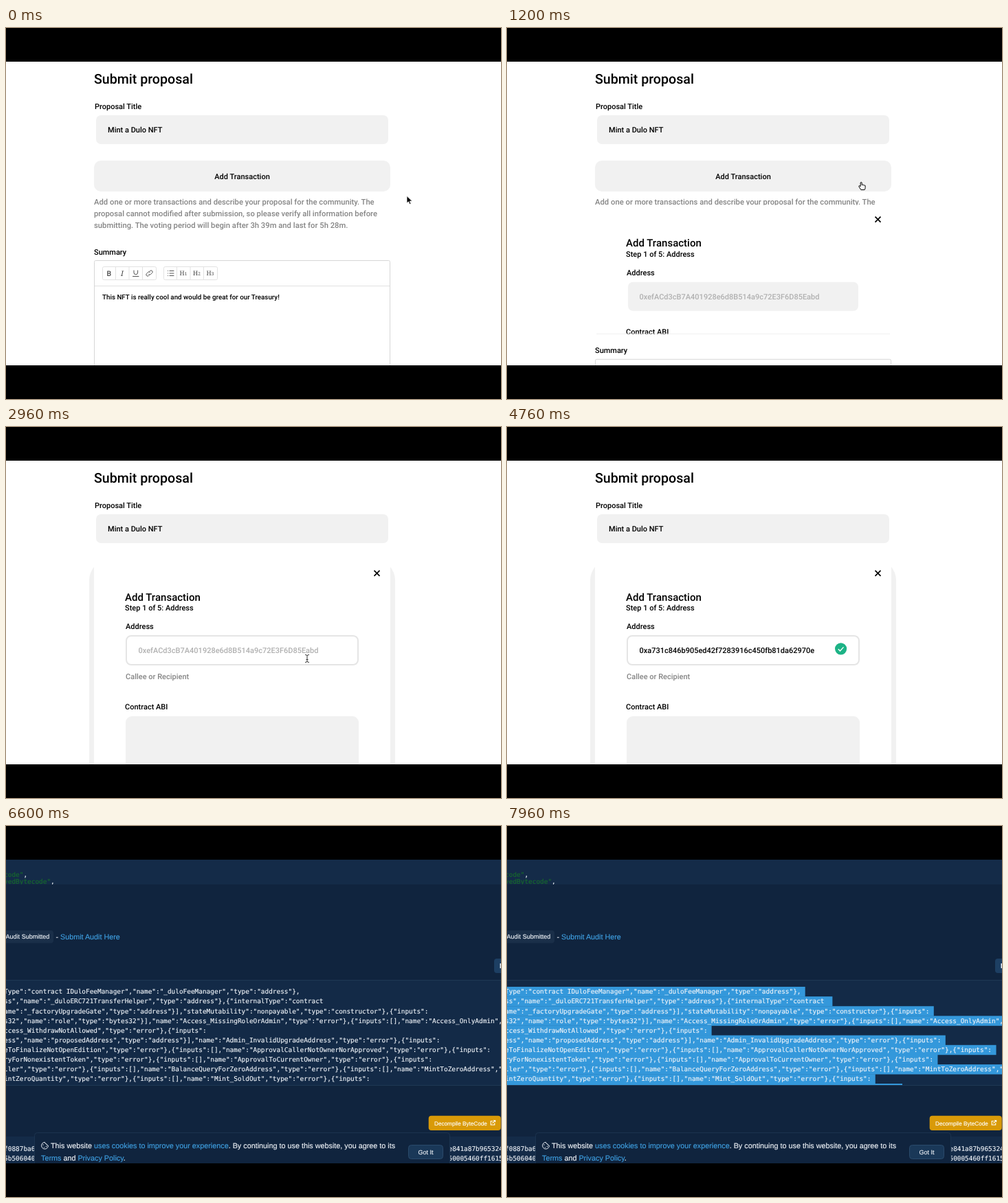
Write an HTML page that moves like this. It is 720 px wide and 540 px high and loops after 8 s.

```html
<!DOCTYPE html>
<html lang="en">
<head>
<meta charset="utf-8">
<title>Proposal form</title>
<style>
  html, body { margin: 0; width: 100%; height: 100%; overflow: hidden; background: #000; }
  svg { display: block; width: 100vw; height: 100vh; }
  text { white-space: pre; text-rendering: geometricPrecision; }
  .ui { font-family: Roboto, sans-serif; font-weight: 500; }
  .site { font-family: "Liberation Sans", Arial, sans-serif; }
  .site text { stroke: currentColor; stroke-width: .15; }
  .site .mono { font-family: "DejaVu Sans Mono", monospace; font-size: 9.418px; }
  .serif { font-family: "Noto Serif", serif; }
</style>
</head>
<body>
<svg id="stage" viewBox="0 0 720 540"></svg>
<script>
const LOOP = 8000;
const COL = 5.67, LEFT = -2.9, ROW = 14.13;
const stage = document.getElementById('stage');

const text = (x, y, s, size = 11, attrs = '') =>
  `<text x="${x}" y="${y}" font-size="${size}" ${attrs}>${s}</text>`;
const rect = (x, y, w, h, fill, r = 0, attrs = '') =>
  `<rect x="${x}" y="${y}" width="${w}" height="${h}" rx="${r}" fill="${fill}" ${attrs}/>`;
const mono = (x, y, s) => `<text class="mono" x="${x}" y="${y}">${s}</text>`;
const line = d => `<path d="${d}" fill="none" stroke="#e2e2e2"/>`;

function toolbar() {
  const box = x => rect(x + .5, 347.5, 78, 19, '#fff', 2, 'stroke="#e2e2e2"') +
    [19.5, 39, 58.5].map(d => line(`M${x + d} 348v18`)).join('');
  const head = (x, n) => `<text class="serif" x="${x}" y="360" font-size="9">H<tspan font-size="6.5">${n}</tspan></text>`;
  return box(140) + box(229) + `<g fill="#444" stroke="none">` +
    text(146.5, 361, 'B', 10.5) +
    text(167, 360.5, 'I', 10.5, 'class="serif" font-style="italic"') +
    head(252.5, 1) + head(272, 2) + head(291.5, 3) + `</g>
    <g fill="none" stroke="#555" stroke-linecap="round">
      <path d="M186 353v3a2.8 2.8 0 0 0 5.6 0v-3M184.5 361.5h8.5"/>
      <path d="M207.5 358.5a2 2 0 0 0 3 0l2-2a2 2 0 0 0-3-3l-1 1M209.5 355.5a2 2 0 0 0-3 0l-2 2a2 2 0 0 0 3 3l1-1"/>
      <path d="M238 353.5h6M238 357h6M238 360.5h6M235.5 353.5h.1M235.5 357h.1M235.5 360.5h.1"/>
    </g>`;
}

function formPage() {
  const note = [
    'Add one or more transactions and describe your proposal for the community. The',
    'proposal cannot modified after submission, so please verify all information before',
    'submitting. The voting period will begin after 3h 39m and last for 5h 28m.'
  ].map((s, i) => text(128, 257 + i * 16.8, s, 11.25, 'fill="#858585"')).join('');
  return `<g id="form" class="ui" fill="#000">
    ${rect(0, 49, 720, 442, '#fff')}
    ${text(128, 80.5, 'Submit proposal', 19.6)}
    ${text(129, 118, 'Proposal Title')}
    ${rect(131, 127, 425, 42, '#f1f1f1', 7)}
    ${text(148, 152, 'Mint a Dulo NFT')}
    ${rect(128, 193, 431, 45, '#f1f1f1', 10)}
    ${text(343.5, 219.5, 'Add Transaction', 11, 'text-anchor="middle"')}
    ${note}
    <g id="summary">
      ${text(128, 329.5, 'Summary')}
      ${rect(128.5, 338.5, 430, 260, '#fff', 2, 'stroke="#d6d6d6"')}
      ${line('M129 375.5h429')}
      ${toolbar()}
      ${text(140, 395, 'This NFT is really cool and would be great for our Treasury!', 9.8)}
    </g>
    ${rect(121, 193, 445, 500, '#f1f1f1', 30, 'id="ring"')}
    <g id="panel" clip-path="url(#panelClip)">
      ${rect(128, 49, 431, 442, '#fff')}
      <g id="content">
        <path d="M535.5 208.8l8 8m0-8l-8 8" stroke="#000" stroke-width="1.7" fill="none"/>
        ${text(173, 252.5, 'Add Transaction', 15)}
        ${text(173, 267, 'Step 1 of 5: Address')}
        ${text(174, 294, 'Address')}
        ${rect(176, 304, 335, 42, '#f1f1f1', 7, 'id="idle"')}
        ${rect(175, 304, 337, 42, '#fff', 7, 'id="focus" stroke="#e5e5e5" stroke-width="2"')}
        ${text(192.5, 329, '0xefACd3cB7A401928e6d8B514a9c72E3F6D85Eabd', 11, 'id="hint" fill="#b0b0b0"')}
        ${text(192.5, 329, '0xa731c846b905ed42f7283916c450fb81da62970e', 11, 'id="value"')}
        ${rect(451, 318, 1, 14, '#000', 0, 'id="caret"')}
        <g id="check"><circle cx="485.6" cy="322.8" r="8.6" fill="#1db386"/>
          <path d="M481.8 323.2l2.7 2.8 5-5.6" fill="none" stroke="#fff" stroke-width="1.4"/></g>
        ${text(174, 366.5, 'Callee or Recipient', 11, 'id="helper" fill="#858585"')}
        <g id="abi">
          ${text(173, 411, 'Contract ABI')}
          ${rect(174, 421, 339, 260, '#f1f1f1', 9)}
        </g>
      </g>
      <path id="edge" d="M130 0h427" stroke="#ececec" fill="none"/>
    </g>
    <g id="cursor">
      <path id="arrow" d="M0 0v10.5l2.5-2.3 1.7 3.9 1.8-.8-1.7-3.7h3.5z" fill="#000" stroke="#fff" stroke-width=".8"/>
      <path id="hand" d="M-1.8-4.5q1-1.2 2 0v3.5q1-.9 1.8.2 1-.8 1.7.3 1.4-.5 1.4 1v2.5q0 1.5-1 3h-5.3q-1.5-2.4-3-4.8 0-1.7 1.4-.9l1 .9z" fill="#fff" stroke="#000"/>
      <path id="beam" d="M-3-5.5q3 0 3 1.5 0-1.5 3-1.5M0-4v8M-3 5.5q3 0 3-1.5 0 1.5 3 1.5M-1.5 1.5h3" fill="none" stroke="#222" stroke-width=".9"/>
    </g>
  </g>`;
}

// Contract interface listing
const named = s => `","name":"${s}`;
const typed = s => `","type":"${s}"}`;
const inputs = ',{"inputs":';
const err = typed('error') + inputs;
const next = s => `[],"name":"${s}`;
const listing = [
  'Type":"contract IDuloFeeManager' + named('_duloFeeManager') + typed('address') + ',',
  'ss' + named('_duloERC721TransferHelper') + typed('address') + ',{"internalType":"contract ',
  'ame":"_factoryUpgradeGate' + typed('address') + '],"stateMutability":"nonpayable' + typed('constructor') + inputs,
  's32' + named('role') + typed('bytes32') + '],"name":"Access_MissingRoleOrAdmin' + err + next('Access_OnlyAdmin') + '","type',
  'ccess_WithdrawNotAllowed' + err,
  'ess' + named('proposedAddress') + typed('address') + '],"name":"Admin_InvalidUpgradeAddress' + err,
  'eToFinalizeNotOpenEdition' + err + next('ApprovalCallerNotOwnerNorApproved') + err,
  'ryForNonexistentToken' + err + next('ApprovalToCurrentOwner') + err,
  'ller' + err + next('BalanceQueryForZeroAddress') + err + next('MintToZeroAddress') + '","type',
  'intZeroQuantity' + err + next('Mint_SoldOut') + err
];

function codePage() {
  const tint = (s, color) => `<tspan fill="${color}" stroke="${color}">${s}</tspan>`;
  const link = s => tint(s, '#3f9fe0');
  const green = s => tint(s, '#176b2c') + ',';
  const marks = listing.map((s, i) =>
    rect(0, 234 + i * ROW, Math.min(720, LEFT + (s.length + 1) * COL), ROW + .3, '#3498db')).join('') +
    rect(0, 375, 575, 2, '#3498db');
  const right = LEFT + 114 * COL;
  return `<g id="code" class="site" fill="currentColor" color="#f0f4f9">
    ${rect(0, 49, 720, 442, '#10243e')}
    ${rect(0, 49, 720, 36, '#142b48')}
    <g clip-path="url(#topClip)">
      ${mono(LEFT, 73.5, green('code"'))}
      ${mono(LEFT, 84.3, green('vedBytecode"'))}
    </g>
    ${rect(-10, 152, 79, 18.5, '#1a2f49', 4)}
    ${text(-.5, 164, 'Audit Submitted', 9.05)}
    ${text(72.5, 164.5, '- ' + link('Submit Audit Here'), 10.75)}
    ${rect(710, 193, 20, 21, '#1d3f63', 4)}
    ${rect(718.5, 200, 1.5, 7, '#e8edf4')}
    ${rect(-2, 224.5, 724, 153, '#132a47', 0, 'stroke="#1f3854"')}
    <g id="marks">${marks}</g>
    <g id="listing">${listing.map((s, i) => mono(LEFT, 244.3 + i * ROW, s)).join('')}</g>
    ${rect(614.7, 421.7, 105, 21.3, '#d99a08', 4)}
    ${text(623, 435.5, 'Decompile ByteCode', 8.2, 'color="#fff" fill="#fff"')}
    <path d="M708 429.5h-2.8v5.5h5.5v-2.8M707.5 432.5l4-4M709 428.5h2.6v2.6" fill="none" stroke="#fff" stroke-width="1.1"/>
    ${rect(0, 452, 720, 39, '#142b48')}
    ${mono(LEFT, 472.5, 'f0887ba6')}${mono(LEFT, 486.6, '5b506040')}
    ${mono(right, 472.5, 'e841a87b965324')}${mono(right, 486.6, '50005460ff1615')}
    ${rect(41.5, 446.5, 604, 60, '#10243e', 4, 'stroke="#1b334f"')}
    <path d="M56.5 460.3a4.9 4.9 0 1 0 4.9 4.9q-2 .2-2.2-2.2-2.5 0-2.7-2.7z" fill="none" stroke="#e8edf4"/>
    <path d="M54 464h.1M55.5 467.8h.1M58.5 466.5h.1" stroke="#e8edf4" stroke-width="1.3" stroke-linecap="round"/>
    ${text(65, 469, 'This website ' + link('uses cookies to improve your experience') +
      '. By continuing to use this website, you agree to its', 10.8)}
    ${text(51, 487, link('Terms') + ' and ' + link('Privacy Policy') + '.', 10.8)}
    ${rect(585.5, 464.5, 50, 20, '#1a3858', 4, 'stroke="#2a4a6b"')}
    ${text(610.5, 477.5, 'Got It', 9, 'text-anchor="middle"')}
  </g>`;
}

stage.innerHTML = `<defs>
    <clipPath id="view"><rect y="49" width="720" height="442"/></clipPath>
    <clipPath id="topClip"><rect y="67" width="720" height="18"/></clipPath>
    <clipPath id="panelClip"><rect id="panelBox" x="128" width="431"/></clipPath>
  </defs>${rect(0, 0, 720, 540, '#000')}
  <g clip-path="url(#view)">${formPage()}${codePage()}</g>`;

const el = {};
stage.querySelectorAll('[id]').forEach(n => el[n.id] = n);

const clamp = v => Math.max(0, Math.min(1, v));
const ease = (t, a, b) => (1 - Math.cos(Math.PI * clamp((t - a) / (b - a)))) / 2;
const show = (node, on) => node.setAttribute('visibility', on ? 'inherit' : 'hidden');
const move = (node, x, y) => node.setAttribute('transform', `translate(${x} ${y})`);
const curve = (k, a, b, c) => a.map((v, i) => (1 - k) ** 2 * v + 2 * k * (1 - k) * b[i] + k * k * c[i]);

function pointer(t) {
  if (t < 880) return curve(ease(t, 0, 800), [583, 244.5], [560, 236], [516, 229.5]);
  if (t < 3900) return curve(ease(t, 1680, 2520), [516, 229.5], [470, 430], [438, 337]);
  return curve(ease(t, 3960, 4320), [438, 337], [440, 190], [476, 54]);
}

function draw(t) {
  const form = t < 5200;
  el.form.style.display = form ? '' : 'none';
  el.code.style.display = form ? 'none' : '';
  if (!form) {
    show(el.marks, t >= 7240);
    return;
  }

  const open = ease(t, 880, 1640), bottom = 302 + 379 * open;
  const top = 298 - 106 * open;
  move(el.summary, 0, 379 * open);
  show(el.panel, open > 0);
  el.panelBox.setAttribute('y', top);
  el.panelBox.setAttribute('height', Math.max(0, bottom - top));
  move(el.content, 0, 106 * (1 - open));
  move(el.edge, 0, bottom - .5);
  el.ring.setAttribute('opacity', clamp((open - .5) * 2));

  const focused = t >= 2520, grow = ease(t, 2520, 2960), pasted = t >= 3320;
  show(el.idle, !focused);
  show(el.focus, focused);
  el.helper.setAttribute('opacity', grow);
  move(el.abi, 0, 31 * (grow - 1));
  show(el.hint, !pasted);
  show(el.value, pasted);
  show(el.check, t >= 3360);
  show(el.caret, pasted && Math.floor((t - 3320) / 480) % 2 === 0);

  const [x, y] = pointer(t);
  const hand = t < 1720 && x < 559 && y < 238;
  const beam = t > 1720 && y > 303 && y < 347;
  move(el.cursor, x, y);
  show(el.cursor, t < 4540);
  show(el.hand, hand);
  show(el.beam, beam);
  show(el.arrow, !hand && !beam);
}

const start = performance.now();
function tick() {
  draw((performance.now() - start) % LOOP);
  requestAnimationFrame(tick);
}
tick();
</script>
</body>
</html>
```
